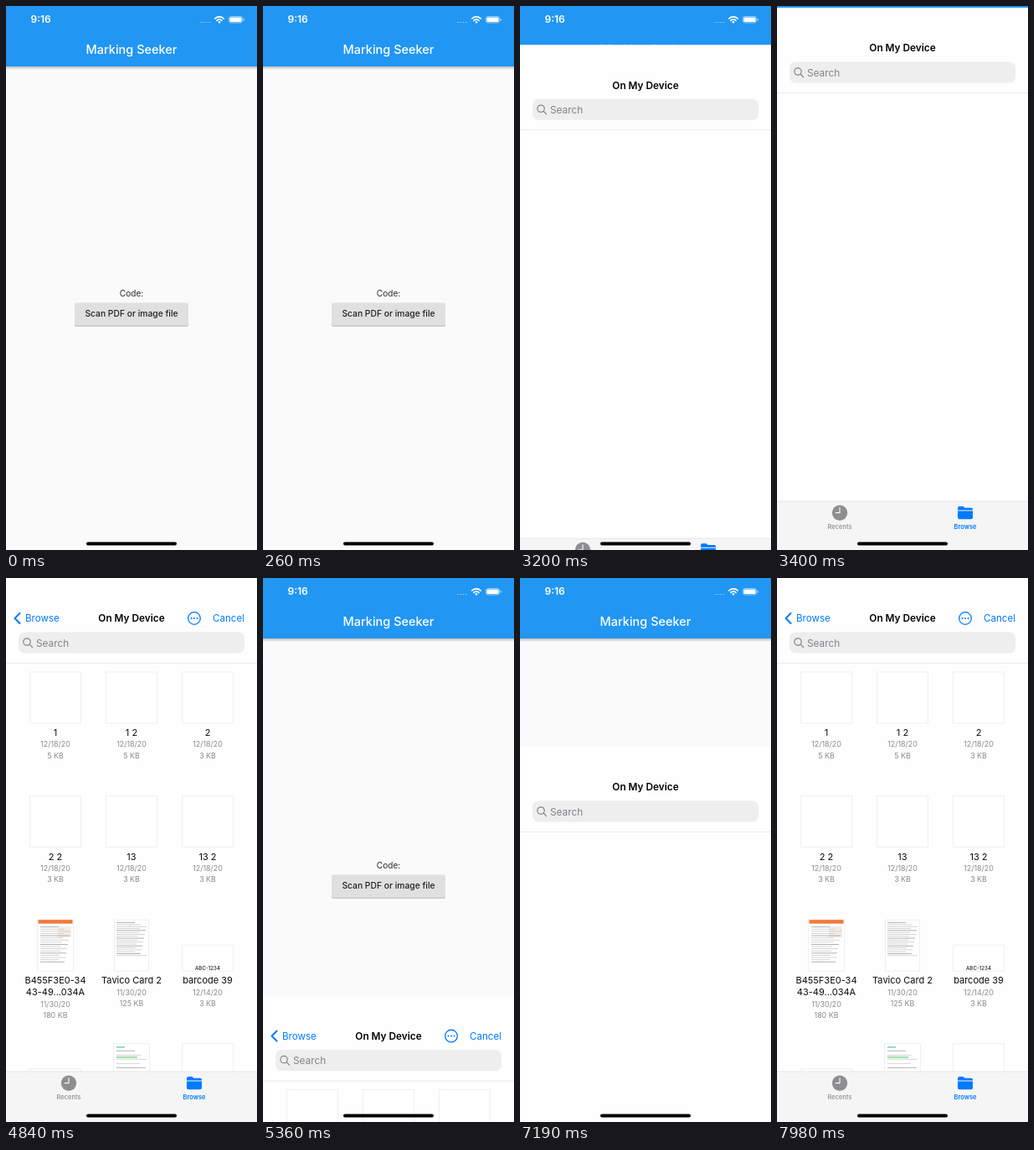
Recreate the animation shown at these times as an HTML page. Size 300 px wide and 648 px high, loop 8000 ms.

```html
<!DOCTYPE html>
<html lang="en">
<head>
<meta charset="utf-8">
<title>File scan</title>
<style>
  html, body { margin: 0; width: 100%; height: 100%; overflow: hidden; background: #fff; }
  svg { display: block; width: 300px; height: 648px; font-family: Inter, "Liberation Sans", sans-serif; }
  .mid { text-anchor: middle; }
  .name { font-size: 11px; fill: #0c0c0c; }
  .info { font-size: 8.9px; fill: #8a8a8e; }
  .line { fill: none; stroke-linecap: round; stroke-linejoin: round; }
</style>
</head>
<body>
<svg viewBox="0 0 300 648">
  <defs>
    <linearGradient id="shade" x2="0" y2="1">
      <stop stop-color="#808080" stop-opacity=".5"/>
      <stop offset="1" stop-color="#808080" stop-opacity="0"/>
    </linearGradient>
  </defs>

  <g id="app">
    <rect width="300" height="648" fill="#fafafa"/>
    <rect y="72" width="300" height="4" fill="url(#shade)"/>
    <rect width="300" height="72" fill="#2196f3"/>
    <g fill="#fff">
      <text x="29.5" y="20.3" font-size="12" font-weight="600">9:16</text>
      <text class="mid" x="150" y="57.2" font-size="14.5" font-weight="500">Marking Seeker</text>
      <path d="M232 19h2v1h-2zm3.3 0h2v1h-2zm3.3 0h2v1h-2zm3.3 0h2v1h-2z" opacity=".45"/>
      <path class="line" d="M249.8 15a7.3 7.3 0 0 1 10.4 0M252 17.3a4.3 4.3 0 0 1 6 0" stroke="#fff" stroke-width="1.7"/>
      <circle cx="255" cy="19.3" r="1.3"/>
      <rect x="266.5" y="12.5" width="16" height="7.5" rx="2.2" fill="none" stroke="#fff" stroke-opacity=".5"/>
      <rect x="267.4" y="13.4" width="14.2" height="5.7" rx="1.4"/>
      <rect x="283.6" y="14.8" width="1.2" height="3" rx=".6" opacity=".6"/>
    </g>
    <g class="mid" font-size="10.1" fill="#2b2b2b">
      <text id="label" x="150" y="346">Code:</text>
      <text id="code" x="150" y="352.3" font-size="9.9">www.panule.com.br</text>
    </g>
    <g id="button">
      <rect x="82" y="355" width="136" height="27" rx="2" fill="#808080" opacity=".4"/>
      <rect x="82" y="353.5" width="136" height="27" rx="2" fill="#e0e0e0"/>
      <rect id="press" x="82" y="353.5" width="136" height="27" rx="2" opacity="0"/>
      <text class="mid" x="150" y="370" font-size="10.3" font-weight="500" fill="#202020">Scan PDF or image file</text>
    </g>
  </g>

  <g id="sheet">
    <rect width="300" height="648" fill="#fefefe"/>
    <text class="mid" x="150" y="52.3" font-size="11.8" font-weight="600">On My Device</text>
    <rect x="15" y="64.5" width="270" height="25" rx="7" fill="#eeeeef"/>
    <g class="line" stroke="#838388" stroke-width="1.2">
      <circle cx="25" cy="76" r="4.2"/>
      <path d="M28.2 79.2l3.3 3.3"/>
    </g>
    <text x="36" y="81.6" font-size="11.8" fill="#838388">Search</text>
    <rect y="101" width="300" height="1" fill="#ebebeb"/>

    <g id="content">
      <g class="line" stroke="#007aff" stroke-width="1.3">
        <path d="M16.5 42l-6 6 6 6" stroke-width="2"/>
        <circle cx="225" cy="48" r="7.3"/>
        <path d="M221.5 48h.01M225 48h.01M228.5 48h.01" stroke-width="2"/>
      </g>
      <g font-size="11.6" fill="#007aff">
        <text x="23" y="52.2">Browse</text>
        <text x="247" y="52.2">Cancel</text>
      </g>
      <g id="files"></g>
    </g>

    <rect y="588" width="300" height="60" fill="#f5f5f5"/>
    <rect y="587.5" width="300" height="1" fill="#e6e6e6"/>
    <circle cx="75" cy="601.7" r="9.2" fill="#8e8e90"/>
    <path class="line" d="M75 595.5v6.2h-4.8" stroke="#f5f5f5" stroke-width="1.2"/>
    <path d="M216 596q0-2 2-2h4.5l2 1.8h7.5q2 0 2 2v.7h-18zM216 599.4h18v7.8q0 2-2 2h-14q-2 0-2-2z" fill="#007aff"/>
    <g class="mid" font-size="7.5" font-weight="500">
      <text x="75" y="620.7" fill="#8e8e90">Recents</text>
      <text x="225" y="620.7" font-weight="600" fill="#007aff">Browse</text>
    </g>
  </g>

  <rect x="96" y="638.4" width="108" height="4" rx="2"/>
</svg>

<script>
const LOOP = 8000, HEIGHT = 648;
const $ = id => document.getElementById(id);
const clamp = v => Math.max(0, Math.min(1, v));

const rect = (x, y, w, h, fill) => `<rect x="${x}" y="${y}" width="${w}" height="${h}" fill="${fill}"/>`;
const text = (cls, x, y, s) => `<text class="mid ${cls}" x="${x}" y="${y}">${s}</text>`;
const card = (x, y, w, h) =>
  `<rect x="${x - w / 2}" y="${y}" width="${w}" height="${h}" fill="#fff" stroke="#efefef"/>`;

// Rows of small grey writing between y and end.
function writing(x, y, end, step) {
  let out = "";
  for (let i = 0; y + i * step < end; i++) {
    out += rect(x - 18, y + i * step, 22 + (i * 7) % 15, 0.9, i % 4 ? "#cfcfcf" : "#a8a8a8");
  }
  return out;
}

const tile = (x, y) => card(x, y, 61, 61);
const label = (x, y) => card(x, y + 30, 61, 31) +
  `<text class="mid" x="${x}" y="${y + 59.3}" font-size="6.2">ABC-1234</text>`;
const bill = (x, y) => card(x, y, 43, 61) + rect(x - 20.5, y, 41, 4.5, "#f07a3c") +
  rect(x + 3, y + 8, 16, 13, "#f1ebe6") + writing(x, y + 8, y + 52, 2.6);
const letter = (x, y) => card(x, y, 41, 61) + writing(x, y + 3, y + 44, 2.3);
const slip = (x, y) => card(x, y, 43, 61) + rect(x - 18, y + 3, 10, 2, "#8fd6d2") +
  rect(x - 18, y + 15, 25, 2, "#9edba6") + writing(x, y + 8, y + 34, 5);

const files = [
  [tile, "1", "12/18/20", "5 KB"], [tile, "1 2", "12/18/20", "5 KB"], [tile, "2", "12/18/20", "3 KB"],
  [tile, "2 2", "12/18/20", "3 KB"], [tile, "13", "12/18/20", "3 KB"], [tile, "13 2", "12/18/20", "3 KB"],
  [bill, "B455F3E0-34|43-49...034A", "11/30/20", "180 KB"],
  [letter, "Tavico Card 2", "11/30/20", "125 KB"],
  [label, "barcode 39", "12/14/20", "3 KB"],
  [label], [slip], [tile]
];

$("files").innerHTML = files.map(([thumb, name = "", date = "", size = ""], i) => {
  const x = 59 + 91 * (i % 3), y = 112 + 147.6 * Math.floor(i / 3);
  const lines = name.split("|"), below = y + 89.4 + (lines.length - 1) * 14;
  return thumb(x, y) +
    lines.map((s, n) => text("name", x, y + 76 + n * 14, s)).join("") +
    text("info", x, below, date) + text("info", x, below + 13.2, size);
}).join("");

// Critically damped spring: the share of the way still to go.
function spring(ms) {
  const x = Math.max(0, ms) * 0.01826;
  return (1 + x) * Math.exp(-x);
}

function sheetTop(t) {
  let left;
  if (t < 5208) left = spring(t - 2965);
  else if (t < 7060) left = 1 - spring(t - 5208);
  else left = spring(t - 7060);
  const y = HEIGHT * left;
  return y < 1 ? 0 : y;
}

function pressed(t, start) {
  return 0.08 * clamp((t - start) / 200) * clamp((start + 500 - t) / 200);
}

function draw(t) {
  const found = t >= 5780, second = t >= 6800;
  $("sheet").setAttribute("transform", `translate(0 ${sheetTop(t).toFixed(2)})`);
  $("content").setAttribute("opacity", clamp((t - (second ? 7620 : 3500)) / 280));
  $("label").setAttribute("y", found ? 339.8 : 346);
  $("code").setAttribute("visibility", found ? "visible" : "hidden");
  $("button").setAttribute("transform", `translate(0 ${found ? 6 : 0})`);
  $("press").setAttribute("opacity", pressed(t, second ? 6800 : 2680));
}

const start = performance.now();
function tick(now) {
  draw(Math.max(0, now - start) % LOOP);
  requestAnimationFrame(tick);
}
draw(0);
requestAnimationFrame(tick);
</script>
</body>
</html>
```
